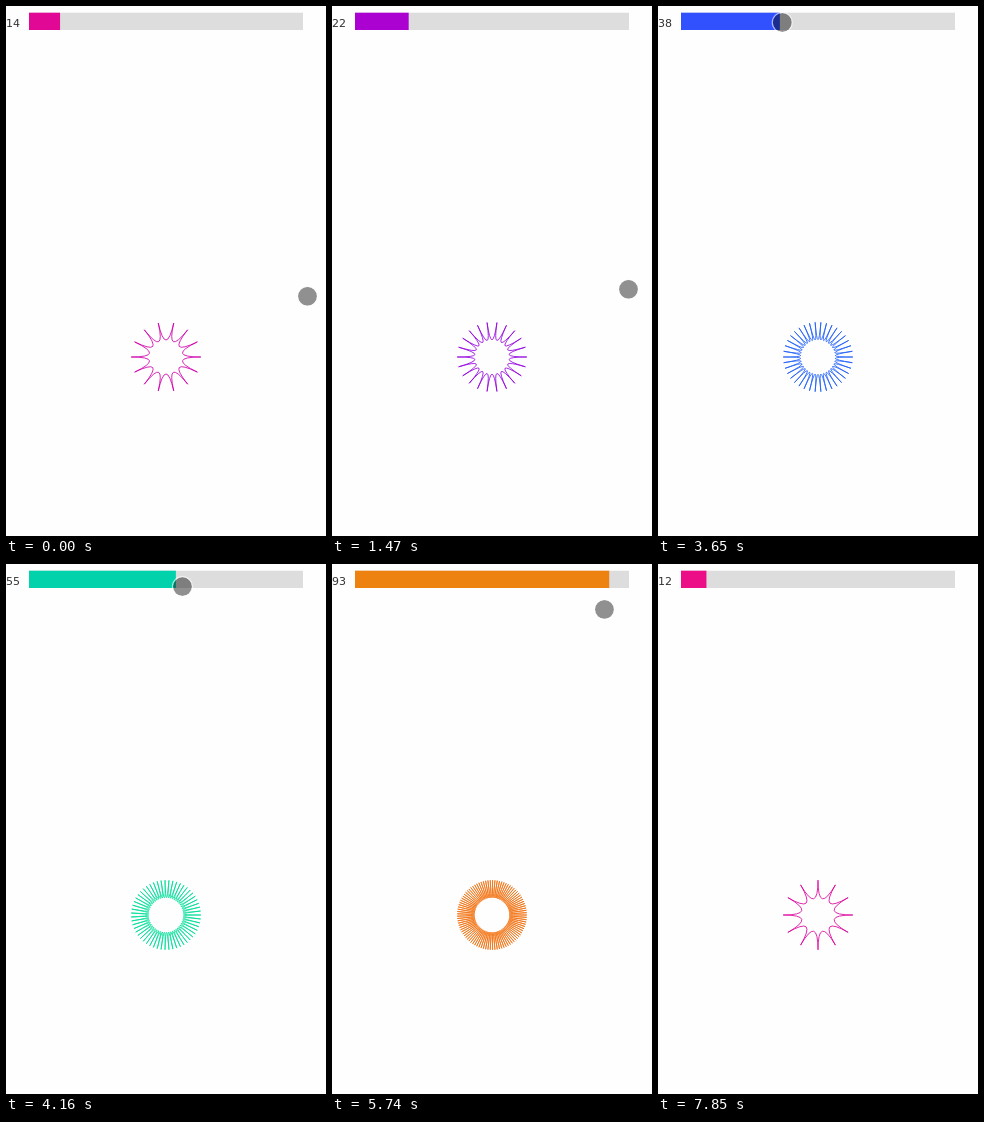
These frames come from a looping animation (320x530 px, 8.42 s). An HTML page:

```html
<!DOCTYPE html>
<html lang="en">
<head>
<meta charset="utf-8">
<title>Spiky ring slider</title>
<style>
  html, body { margin: 0; width: 100%; height: 100%; overflow: hidden; background: #fefefe; }
  svg { display: block; width: 100%; height: 100%; }
  text { font: 11px "DejaVu Sans", sans-serif; fill: #333; }
</style>
</head>
<body>
<svg viewBox="0 0 320 530">
  <text id="label" x="0" y="20.9"></text>
  <rect x="23" y="6.7" width="274" height="17.3" fill="#ddd"/>
  <rect id="bar" x="23" y="6.7" height="17.3"/>
  <path id="ring" fill="none" stroke-opacity=".85"/>
  <g id="pointer">
    <circle r="9.5" fill="#000" fill-opacity=".43"/>
    <circle r="10" fill="none" stroke="#fff" stroke-opacity=".6" stroke-width="1.2"/>
  </g>
</svg>
<script>
const LOOP = 8420, STEP = 130, HIDE = 7850;
const MIN = 3, MAX = 100, TRACK_X = 23, TRACK_W = 274;
const CX = 160, CY = 351, R = 34.8;
const COUNT_FROM = 14, COUNT_EVERY = 190;   // the value rises by itself,
const GRAB = 3650, RELEASE = 7000, LAG = 20; // then follows the pointer

// The picture is held for STEP ms, counted from the start of each run.
const runs = [0, 1470, 3650, 5410];

const easeIn = p => p ** 3;
const easeOut = p => 1 - (1 - p) ** 3;
const smooth = p => p * p * (3 - 2 * p);

// Pointer stops: time, x, y, easing on the way there
const stops = [
  [0, 301.5, 290.3], [1320, 301.5, 290.3, smooth],
  [1470, 296.5, 283.3, smooth],
  [2510, 202.5, 149.5, easeIn],
  [3650, 124.3, 16.5, easeOut],
  [4710, 294.5, 36.4, smooth],
  [4950, 312, 44, smooth], [5380, 312, 44, smooth],
  [6560, 51, 53.5, smooth], [7620, 51, 53.5, smooth],
  [7750, 177.5, 147.5, smooth]
];

function pointerAt(t) {
  const i = stops.findIndex(s => s[0] > t);
  if (i < 0) return stops[stops.length - 1].slice(1, 3);
  const [t0, x0, y0] = stops[i - 1], [t1, x1, y1, ease] = stops[i];
  const p = ease((t - t0) / (t1 - t0));
  return [x0 + (x1 - x0) * p, y0 + (y1 - y0) * p];
}

function valueAt(t) {
  if (t < GRAB) return Math.round(COUNT_FROM + t / COUNT_EVERY);
  const [x] = pointerAt(Math.min(t, RELEASE) - LAG);
  const v = Math.floor(MIN + (x - TRACK_X) * (MAX - MIN) / TRACK_W);
  return Math.max(MIN, Math.min(MAX, v));
}

function sinebow(t) {
  const channel = k => Math.round(255 * Math.sin((t - 0.5 + k / 3) * Math.PI) ** 2);
  return `rgb(${channel(0)},${channel(1)},${channel(2)})`;
}

// Tips on a circle, joined by quadratic curves pulled to the centre.
function ringPath(n) {
  let d = `M${CX + R} ${CY}`;
  for (let i = 1; i <= n; i++) {
    const a = i / n * 2 * Math.PI;
    d += `Q${CX} ${CY} ${(CX + R * Math.cos(a)).toFixed(2)} ${(CY + R * Math.sin(a)).toFixed(2)}`;
  }
  return d;
}

const [label, bar, ring, pointer] =
  ["label", "bar", "ring", "pointer"].map(id => document.getElementById(id));

function draw(t) {
  const v = valueAt(t), part = (v - MIN) / (MAX - MIN);
  label.textContent = v;
  bar.setAttribute("width", TRACK_W * part);
  bar.setAttribute("fill", sinebow(part * 0.985));
  ring.setAttribute("d", ringPath(v));
  ring.setAttribute("stroke", sinebow(v / 100));
  pointer.setAttribute("transform", `translate(${pointerAt(t).join(" ")})`);
}

const start = performance.now();
function frame() {
  const t = (performance.now() - start) % LOOP;
  const run = runs.filter(r => r <= t).pop();
  draw(run + Math.floor((t - run) / STEP) * STEP);
  pointer.setAttribute("visibility", t < HIDE ? "visible" : "hidden");
  requestAnimationFrame(frame);
}
frame();
</script>
</body>
</html>
```
